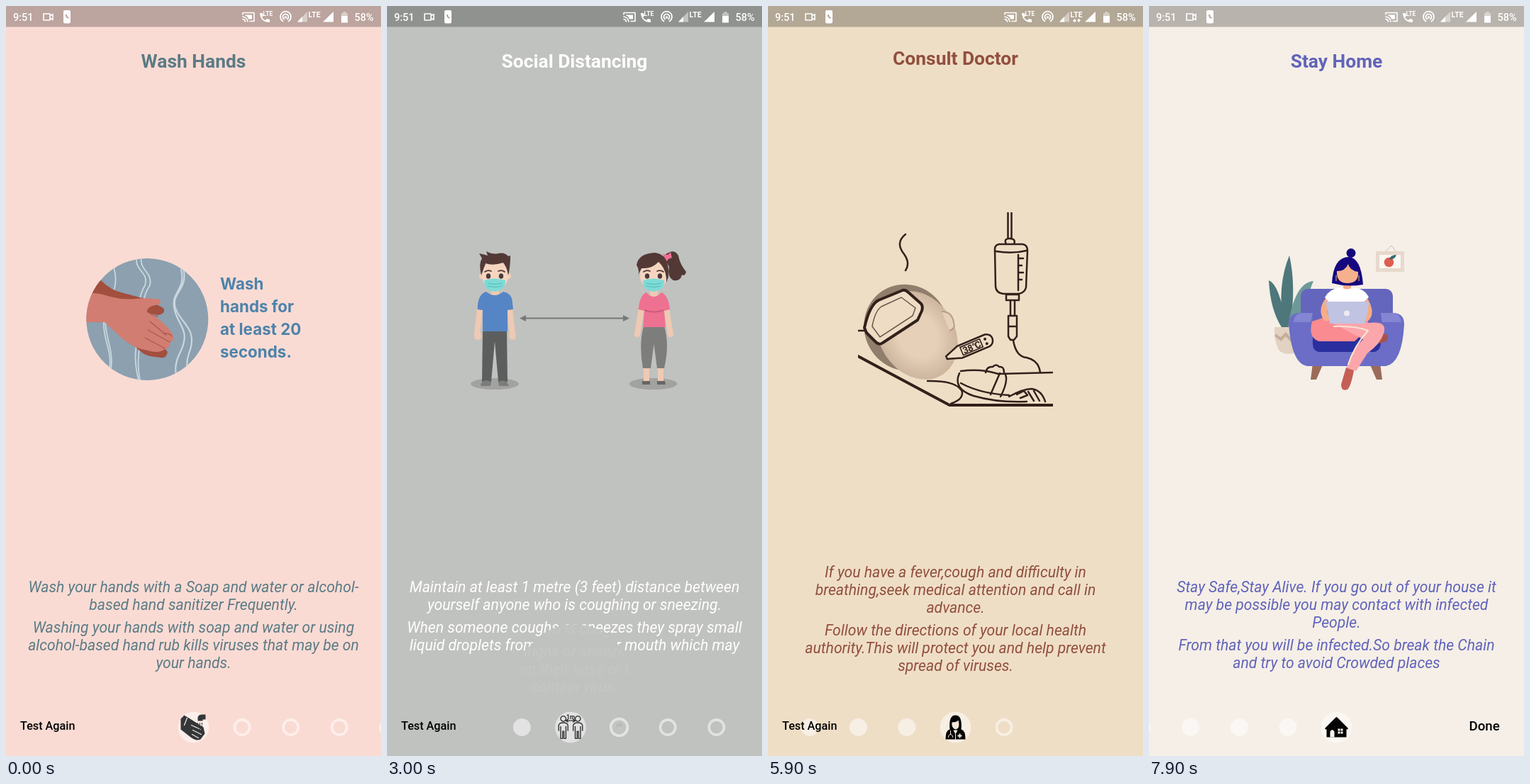
An HTML page for the animation above (8 s loop, 529 by 1058 pixels).

```html
<!DOCTYPE html>
<html lang="en">
<head>
<meta charset="utf-8">
<title>Health tips onboarding</title>
<style>
html, body { margin: 0; width: 100%; height: 100%; overflow: hidden; }
svg { display: block; width: 100%; height: 100%; font-family: Roboto, sans-serif; }
.title { font-size: 26.4px; font-weight: 700; text-anchor: middle; }
.body { font-size: 21.2px; font-style: italic; text-anchor: middle; }
.line { fill: none; stroke-linecap: round; stroke-linejoin: round; }
.btn { font-weight: 500; }
</style>
</head>
<body>
<svg id="stage" viewBox="0 0 529 1058" preserveAspectRatio="none">
<defs>
<clipPath id="reveal"><circle id="hole" cx="264.5" cy="952.2" r="0"/></clipPath>
<clipPath id="disc"><circle cx="199.300" cy="442" r="86"/></clipPath>
<clipPath id="bust"><path d="M115 347H415V546.500H115Z"/></clipPath>
<clipPath id="bed"><path d="M127 291H402V566H127Z"/></clipPath>
<radialGradient id="skin"><stop offset=".5" stop-color="#e6d0b8"/><stop offset="1" stop-color="#cdb59e"/></radialGradient>

<!-- hands -->
<g id="art0">
  <g clip-path="url(#disc)">
    <path fill="#8ca0b0" d="M113 356H286V528H113Z"/>
    <g class="line" stroke="#c9d7dd" stroke-width="1.800">
      <path d="M150 362Q158 385 152 402M138 445C136 470 150 485 146 512M140 445C141 470 152 487 148 512"/>
      <path d="M184 355C182 375 202 375 196 394Q190 405 189 413M191 355C188 373 207 375 203 394Q196 405 195 413M184 478Q180 500 187 528M189 480Q184 500 189 528"/>
      <path d="M250 370C258 400 232 405 239 426C246 448 272 455 258 490Q252 508 259 525M247 372C254 400 234 402 237 424C240 450 262 455 246 488Q237 505 240 520" stroke-width="2.200"/>
    </g>
    <path fill="#a24f3e" d="M119 405Q125 392 134 387Q147 401 166 405L196 413Q213 421 222 426Q226 434 214 436L200 433L165 428ZM182 480Q193 492 203 494L218 496Q226 497 227 491Q230 486 222 483L200 478Z"/>
    <path fill="#d27d71" d="M110 405Q130 404 147 410Q165 415 183 413Q203 411 217 414Q221 421 211 422Q199 424 199 431C213 439 230 452 236 465Q238 472 231 475Q232 482 224 484Q216 491 200 486Q180 483 164 469L139 446H110Z"/>
    <path class="line" stroke="#a8594f" stroke-width="1.300" d="M203 445L226 464M200 457L231 474M196 468L224 483M199 431Q207 437 214 438M222 462Q231 461 234 466"/>
  </g>
  <g id="wash" fill="#4c83aa" font-family="Inter, sans-serif" font-size="22.400" font-weight="700"></g>
</g>

<!-- distance -->
<g id="art1">
  <g fill="#a2a3a0"><ellipse cx="152" cy="533" rx="34" ry="8"/><ellipse cx="375.500" cy="533" rx="34" ry="8"/></g>
  <path fill="none" stroke="#777977" stroke-width="2" d="M194 440.500H336"/>
  <path fill="#777977" d="M187 440.500L196 436V445ZM342 440.500L333 436V445Z"/>
  <g>
    <path class="line" stroke="#efc9b3" stroke-width="8" d="M131 425L127 463M173 425L177 463"/>
    <ellipse fill="#efc9b3" cx="128" cy="465" rx="5" ry="6"/><ellipse fill="#efc9b3" cx="177" cy="465" rx="5" ry="6"/>
    <path fill="#5c5e5d" d="M135 456H169L170 530H157L152 473L147 530H134Z"/>
    <path fill="#7b7c7b" d="M132 536Q133 528 140 528L147 530L146 536ZM158 536L157 530Q168 525 172 536Z"/>
    <path fill="#efc9b3" d="M147 394H158V409H147Z"/>
    <path fill="#5685c5" d="M140 403Q152 413 164 403Q175 405 176.500 415L178 428L170 429V459H135V429L127.500 428Q128 406 140 403Z"/>
    <circle fill="#f3cfb8" cx="134" cy="381" r="4"/><circle fill="#f3cfb8" cx="171" cy="381" r="4"/>
    <ellipse fill="#f5d5c0" cx="152.500" cy="380" rx="18.500" ry="21"/>
    <path fill="#523936" d="M133 380Q129 363 134 356L130 349Q139 351 142 352L140 346Q149 351 157 349Q166 347 171 353L174 352Q174 368 171 380Q169 368 164 362Q149 367 139 363Z"/>
  </g>
  <g>
    <path fill="#523936" d="M390 353Q404 340 411 352Q413 364 422 375Q420 382 416 379Q414 389 404 387Q395 382 398 368Z"/>
    <path fill="#ee7191" d="M389 350L396 351L400 347L402 355L397 357L394 361Z"/>
    <path class="line" stroke="#efc9b3" stroke-width="8" d="M360 420L353 463M393 420L400 463M366 508V529M386 508V529"/>
    <path fill="#7d7e7c" d="M362 451H391Q399 478 391 511H381L376.500 477L372 511H361Q355 478 362 451Z"/>
    <path fill="#666" d="M360 529H371V534H360ZM381 529H392L393 534H381Z"/>
    <path fill="#efc9b3" d="M371 395H382V412H371Z"/>
    <path fill="#ee7191" d="M366 404Q376 416 387 404Q397 408 399 428L391 430L393 453H361L363 430L354.500 428Q357 407 366 404Z"/>
    <path fill="none" stroke="#b84f72" stroke-width="2" stroke-dasharray="2 1" d="M364 429Q376 434 390 429"/>
    <ellipse fill="#f5d5c0" cx="376" cy="380" rx="19" ry="21"/>
    <path fill="#523936" d="M354 380Q357 375 352 365Q355 349 378 348Q399 350 397 382L394 390Q395 372 383 361Q374 371 359 370Z"/>
  </g>
  <g id="faces"></g>
</g>

<!-- face -->
<g id="art2" clip-path="url(#bust)">
  <path fill="#189b92" d="M121 549Q132 522 165 512L225 493H300L318 499Q340 506 365 512Q396 521 408 549Z"/>
  <path fill="#075165" d="M208 400L209 345H320Q323 368 322 400L314 438L303 464L299 486H214V440Z"/>
  <g fill="#fafafa" stroke="#075165" stroke-width="4"><path d="M216 398Q204 388 202 404Q202 432 214 441M313 398Q326 388 328 404Q327 432 315 441"/></g>
  <path fill="#fafafa" d="M217 362H278Q291 361 298 354Q312 366 313 395V430Q308 454 299 463V487L319 500Q297 521 262 514L212 500L216 430Z"/>
  <path class="line" stroke="#075165" stroke-width="4" d="M229 407Q240 415 251 407M281 407Q292 415 304 407"/>
  <path class="line" fill="#fafafa" stroke="#075165" stroke-width="4" style="fill:#fafafa" d="M198 551L216 507Q212 475 220 454Q229 449 229 474L252 426Q258 416 267 423Q274 415 283 426Q294 423 298 435Q297 443 293 450Q303 446 303 456Q302 464 292 482Q273 511 266 514Q255 529 249 551"/>
  <path class="line" stroke="#075165" stroke-width="4" d="M267 424L247 466M283 426L263 469M294 448L279 477"/>
  <path stroke="#e55e50" stroke-width="11" d="M227 490L260 523M260 490L227 523"/>
</g>

<!-- doctor -->
<g id="art3" clip-path="url(#bed)">
  <g class="line" stroke="#32201b" stroke-width="2.500">
    <path stroke-width="4" d="M125 493L256 563H404"/>
    <path d="M125 458H136M194 322Q179 334 192 350Q201 363 194 373"/>
    <path d="M272 515Q300 511 325 519Q362 518 404 517M225 529Q263 528 273 542Q278 554 258 561M270 518Q260 540 290 550Q325 560 365 558M272 532Q300 547 340 549"/>
    <path d="M314 548L327 518M328 551Q339 530 335 520M307 517Q309 508 317 509Q322 504 326 509Q333 508 333 517M340 551Q360 540 372 540Q386 542 391 558M351 548L361 543L366 549L356 553M367 544L375 557M375 543L383 557"/>
    <path d="M338.500 290V328M343.500 290V328M336 336Q332 328 341 328Q350 328 347 336M326 336H359Q366 337 366 345L364 397Q362 405 353 406H332Q322 405 321 396L320 343Q320 337 326 336Z"/>
    <path d="M321 346Q345 350 365 345M353 351V401M353 356H360M353 366H358M353 376H360M353 386H358M336 407H354V415H336ZM342 416V436M348 416V436M339 437H351V466L347 471H342L339 466ZM339 452H351M346 472Q350 495 365 496Q382 500 384 517"/>
  </g>
  <g transform="rotate(-33 203 462)">
    <ellipse cx="201" cy="451" rx="59" ry="62" fill="#907d6b"/>
    <ellipse cx="208" cy="468" rx="53" ry="66" fill="url(#skin)"/>
  </g>
  <path fill="#e6d0b8" stroke="#b49d88" stroke-width="2" d="M245 431Q260 431 262 447Q265 455 256 458"/>
  <path fill="#eedcc5" stroke="#32201b" stroke-width="4" stroke-linejoin="round" d="M136 454Q143 422 156 415L190 401Q194 400 198 404L216 420Q219 424 217 430L211 443L162 475Q157 479 152 474L139 461Z"/>
  <path fill="none" stroke="#6a5548" stroke-width="1.500" d="M147 452Q151 430 160 424L188 411L208 426L204 437L158 467Z"/>
  <g transform="translate(252 496) rotate(-23)">
    <path fill="#eedcc5" stroke="#32201b" stroke-width="2.500" d="M0 -2L20 -9H62Q70 -7 70 0Q69 8 62 9H20L0 2Z"/>
    <path fill="none" stroke="#32201b" stroke-width="1.600" d="M23 -6H53V6H23Z"/>
    <text x="25" y="5" font-size="13" font-weight="700" fill="#32201b">38℃</text>
    <circle cx="60" cy="-3" r="2" fill="#32201b"/><circle cx="60" cy="4" r="2" fill="#32201b"/>
  </g>
</g>

<!-- home -->
<g id="art4">
  <path fill="#4d777b" d="M187 453Q171 428 169 387Q184 392 194 453ZM190 453Q180 395 198 352Q208 395 199 453Z"/>
  <path fill="#6f9999" d="M196 453Q205 390 232 388Q225 403 225 415Q215 430 203 453Z"/>
  <path fill="#e2d2c2" d="M177 453H208L210 489Q190 494 183 485Q176 472 177 453Z"/>
  <path fill="none" stroke="#c5ad9a" stroke-width="4" d="M178 464L186 470L193 463L200 471L208 464"/>
  <path fill="#9a6b58" d="M231 504H246L236 527H228ZM311 504H326L329 527H321Z"/>
  <rect x="214" y="399" width="130" height="85" rx="10" fill="#6466bd"/>
  <rect x="229" y="463" width="99" height="27" rx="9" fill="#2a2e9f"/>
  <path fill="#6b6dc6" d="M197 447Q199 433 212 433H231V473Q230 487 240 488H318Q328 486 327 470V433H346Q360 434 360 449Q357 504 334 508H224Q201 506 197 447Z"/>
  <path fill="#8486d4" d="M204 443Q207 433 216 433H231L228 446H204ZM327 433H346Q355 435 356 446H329Z"/>
  <path fill="#a6534f" d="M314 463L336 463Q340 473 329 475L312 478Z"/>
  <path fill="#f98b91" d="M230 445Q224 468 240 473H290L309 455V440H245Z"/>
  <path fill="#fba6ab" d="M258 447H311Q337 444 331 462Q326 477 308 490L292 515L279 510Q284 488 302 470Z"/>
  <path class="line" stroke="#f8e9d5" stroke-width="2" d="M261 452Q292 451 309 458Q289 480 281 506"/>
  <path fill="#c65e55" d="M278 510L289 514Q285 536 280 541Q271 544 271 534Z"/>
  <path class="line" stroke="#f5ad89" stroke-width="9" d="M252 416Q243 429 250 440M305 416Q314 432 307 440"/>
  <path fill="#f5ad89" d="M274 385H285V403H274Z"/>
  <path fill="#fff" d="M272 397Q279 402 287 397Q304 398 310 411L302 418H254L248 411Q255 398 272 397Z"/>
  <circle cx="285" cy="348.500" r="6.500" fill="#15087f"/>
  <path fill="#15087f" d="M258 391Q260 355 281 354Q299 354 302 393Q280 397 258 391Z"/>
  <path fill="#f5b18d" d="M265 374Q277 374 281 364Q283 373 295 375Q296 391 280 391Q264 391 265 374Z"/>
  <path fill="none" stroke="#eac56e" d="M264 380V388M296 380V388"/>
  <path fill="#c1c3e2" d="M251 417H308Q310 417 310 420L305 448H255L250 421Q249 417 251 417Z"/>
  <circle cx="279" cy="433.500" r="4" fill="#eceaf3"/>
  <path fill="none" stroke="#cdbfb2" d="M333 347L342 338L349 347"/>
  <path fill="#fbf7f2" stroke="#e7d9cd" stroke-width="5" d="M322.500 348.500H357.500V372.500H322.500Z"/>
  <circle cx="338.500" cy="361.500" r="6.800" fill="#e15d50"/><path fill="#3d6e6e" d="M339 358Q340 351 349 351Q347 358 339 358Z"/>
</g>

<!-- indicator icons, centred on 0 0 -->
<g id="icon0">
  <path fill="#343638" d="M-18 -12L-13 -17Q0 -9 14 0L16 9L10 17Q4 20 -4 14L-18 3ZM6 -9V-14Q7 -18 12 -18H17V-11H13V-9Z"/>
  <path class="line" stroke="#eee6df" stroke-width="1.300" d="M-9 -13L-13 -3M-3 -3L10 3M-1 4L11 10M-2 10L7 15"/>
  <path class="line" stroke="#343638" stroke-width="1.200" stroke-dasharray="2 2" d="M6 -6V4M9 -6V4M12 -6V4"/>
</g>
<g id="icon1" class="line" stroke="#222" stroke-width="1.500">
  <path id="mate" d="M-11 -9A4 4 0 1 1 -10.900 -9M-18 5V-3Q-17 -7 -11 -7Q-5 -7 -4 -3V5M-15 -1V17H-12V6H-10V17H-7V-1"/>
  <use href="#mate" x="22"/>
  <path d="M-7 -10H7M-7 -10L-4 -12M-7 -10L-4 -8M7 -10L4 -12M7 -10L4 -8"/>
  <text y="-12" font-size="9" font-weight="700" text-anchor="middle" fill="#222" stroke="none">1m</text>
</g>
<g id="icon2">
  <path fill="#fff" stroke="#222" stroke-width="1.500" d="M-15 -4Q-19 -3 -17 3Q-16 8 -13 7Q-10 24 0 24Q10 24 13 7Q17 7 17 1Q18 -4 15 -4Z"/>
  <path fill="#252525" d="M-16 2Q-20 -10 -14 -17L-8 -19L-9 -22L-2 -20L1 -25L4 -21L10 -21L10 -18L16 -16Q20 -9 16 2L13 -5Q7 -11 3 -8Q-5 -7 -10 -11Z"/>
  <path class="line" stroke="#222" stroke-width="1.400" d="M-9 0H-4M4 0H9M-7 4V5M7 4V5M0 4L-1 10H1M-5 15Q0 19 5 15"/>
</g>
<g id="icon3">
  <path fill="#050505" d="M-8 3Q-10 -17 0 -17Q10 -17 8 3Q14 4 14 17H-14Q-14 4 -8 3Z"/>
  <path fill="#f3e8d9" d="M-5 -7Q2 -7 4 -10Q7 2 0 3Q-6 1 -5 -7ZM-3 4H3L0 10ZM5 9H7V11H9V13H7V15H5V13H3V11H5Z"/>
  <path class="line" stroke="#f3e8d9" d="M-7 5V10M-10 14Q-10 10 -7 10Q-4 10 -4 14M0 10V17"/>
</g>
<g id="icon4">
  <path fill="#050505" d="M-16 1L-1 -14Q0 -15 1 -14L16 1Q17 3 14 3V14H-14V3Q-17 3 -16 1Z"/>
  <path fill="#f8f4ef" d="M-9 14V6Q-6 1 -3 6V14ZM2 2H5V5H2ZM6 2H9V5H6ZM2 6H5V9H2ZM6 6H9V9H6Z"/>
</g>
</defs>

<g id="base"></g>
<g id="top" clip-path="url(#reveal)"></g>
<g id="dots"></g>
<text id="again" class="btn" x="20" y="1021.300" font-size="16.200">Test Again</text>
<text id="done" class="btn" x="451.500" y="1022" font-size="18.700">Done</text>

<!-- status bar -->
<path d="M0 0H529V29.500H0Z" opacity=".25"/>
<g fill="#fff" class="btn" font-size="14.500">
  <text x="10" y="21">9:51</text><text x="491.500" y="21">58%</text>
  <g class="line" stroke="#fff" stroke-width="1.600">
    <path d="M53 11H62V20H53ZM62 14L66 11.500V19.500L62 17"/>
    <path d="M334 12V9.500H350V21.500H344M334 15Q340 16 341 22M334 18.500Q337 19 337.500 22"/>
    <path d="M390.500 21.500A7.500 7.500 0 1 1 398.500 21.500M392 18.500A4 4 0 1 1 397 18.500" stroke-width="1.800"/>
  </g>
  <rect x="81" y="6" width="10" height="18.500" rx="2"/>
  <path fill="#b3a49e" d="M84 12Q84 19 90 17Q86 16 86 12Z"/>
  <path d="M337 12.500H347V18.500H342Q341 14 337 13.500ZM358 10H362L363 14L361 16Q363 19 366 20L368 18L372 19V23Q359 23 358 10Z"/>
  <circle cx="394.500" cy="16" r="1.800"/>
  <path opacity=".45" d="M411 22.500L425 8V22.500Z"/><path d="M411 22.500L418 15V22.500ZM447 22.500L462 8V22.500Z"/>
  <path opacity=".45" d="M473 10H475.500V8H479.500V10H482V15H473Z"/><path d="M473 14H482V23.500H473Z"/>
  <text x="362.500" y="13.500" font-size="8.500" font-weight="700">LTE</text>
  <text x="426.500" y="16" font-size="10.500" font-weight="700">LTE</text>
  <path id="traffic" d="M430 21L432.500 18L435 21L432.500 23ZM436 20L438.500 18L441 20L438.500 23Z"/>
</g>
</svg>
<script>
const $ = id => document.getElementById(id);
const MID = 264.5, GAP = 68.6, UNIT = 1.247, RADIUS = 988;

// bg, ink, title, title baseline, lines, first baselines of both paragraphs
const pages = [
  { bg: '#fadbd4', ink: '#5b7b85', title: 'Wash Hands', y: 87, at: [827, 883.5],
    text: [['Wash your hands with a Soap and water or alcohol-', 'based hand sanitizer Frequently.'],
      ['Washing your hands with soap and water or using', 'alcohol-based hand rub kills viruses that may be on', 'your hands.']] },
  { bg: '#c0c2bf', ink: '#fff', title: 'Social Distancing', y: 87, at: [827, 883.5],
    text: [['Maintain at least 1 metre (3 feet) distance between', 'yourself anyone who is coughing or sneezing.'],
      ['When someone coughs or sneezes they spray small', 'liquid droplets from their nose or mouth which may', 'contain virus.']] },
  { bg: '#b9dcda', ink: '#149a91', title: "Don't touch your face", y: 89, at: [837.5, 881],
    text: [['Hands touch many surfaces and can pick up viruses.'],
      ['Once contaminated, hands can transfer the virus to', 'your eyes, nose or mouth. From there, the virus can', 'enter your body and can make you sick.']] },
  { bg: '#efdec6', ink: '#914f3e', title: 'Consult Doctor', y: 83, at: [806, 887.5],
    text: [['If you have a fever,cough and difficulty in', 'breathing,seek medical attention and call in', 'advance.'],
      ['Follow the directions of your local health', 'authority.This will protect you and help prevent', 'spread of viruses.']] },
  { bg: '#f5efe7', ink: '#6163ba', title: 'Stay Home', y: 87, at: [827, 908.5],
    text: [['Stay Safe,Stay Alive. If you go out of your house it', 'may be possible you may contact with infected', 'People.'],
      ['From that you will be infected.So break the Chain', 'and try to avoid Crowded places']] }
];

// time and page position
const track = [[0, 0], [600, .38], [700, .38], [800, .42], [900, .42], [1000, .5], [1600, .586], [1800, .95],
  [1900, .985], [2000, 1], [2600, 1], [3000, 1.081], [3200, 1.38], [3300, 1.38], [3400, 1.55], [3900, 1.98],
  [4000, 2], [4800, 2], [4900, 2.04], [5000, 2.04], [5800, 2.97], [5900, 3], [6200, 3], [6700, 3.291],
  [7100, 3.42], [7200, 3.55], [7600, 3.95], [7700, 4], [8000, 4]];

const lines = (rows, x, y, step) => rows.map((s, i) => `<text x="${x}" y="${y + i * step}">${s}</text>`).join('');

const layer = ({ bg, ink, title, y, at, text }, i) => `<g>
  <rect width="529" height="1058" fill="${bg}"/>
  <text class="title" x="${MID}" y="${y}" fill="${ink}">${title}</text>
  <g><use href="#art${i}"/></g>
  <g class="body" fill="${ink}">${text.map((rows, k) => lines(rows, MID, at[k], 25)).join('')}</g></g>`;

const maskedFace = x => `<g fill="#4b3a38"><ellipse cx="${x - 9}" cy="381" rx="3.200" ry="3.800"/><ellipse cx="${x + 9}" cy="381" rx="3.200" ry="3.800"/></g>
  <path class="line" stroke="#523936" stroke-width="1.800" d="M${x - 14} 375q4 -3 9 -1m10 0q5 -2 9 1"/>
  <path fill="#7edbd7" d="M${x - 15} 387q15 -5 30 0q1 13 -15 16q-16 -3 -15 -16"/>
  <path class="line" stroke="#55b9ba" d="M${x - 10} 391q10 3 20 0m-20 4q10 3 20 0"/>`;

$('wash').innerHTML = lines(['Wash', 'hands for', 'at least 20', 'seconds.'], 302, 399.5, 32.2);
$('faces').innerHTML = maskedFace(152) + maskedFace(376);
$('base').innerHTML = $('top').innerHTML = pages.map(layer).join('');
$('dots').innerHTML = pages.map((p, i) =>
  `<g><circle fill="#fff"/><circle fill="none" stroke="#fff" stroke-opacity=".53" stroke-width="3.700"/><use href="#icon${i}"/></g>`).join('');

const base = [...$('base').children], top_ = [...$('top').children], dots = [...$('dots').children];

function position(t) {
  const k = track.findIndex(([end]) => t < end);
  const [t0, a] = track[k - 1], [t1, b] = track[k];
  return a + (b - a) * (t - t0) / (t1 - t0);
}

const only = (list, i) => list.forEach((g, k) => g.style.display = k === i ? '' : 'none');

function drawPages(cur, p) {
  // The incoming page takes over once the drag is about half way.
  const next = p < .48 ? cur : cur + 1;
  only(base, cur);
  only(top_, p > 0 ? next : -1);
  $('hole').setAttribute('r', RADIUS * p);
  if (p > 0) [...top_[next].children].slice(1).forEach((el, k) => {
    const shift = (k === 1 ? 50 : 30) * UNIT * (1 - p);
    el.setAttribute('transform', `translate(0 ${shift})`);
    el.setAttribute('opacity', p);
  });
}

function drawDots(pos, cur) {
  dots.forEach((dot, i) => {
    const active = Math.max(0, 1 - Math.abs(i - pos));
    const r = Math.min(20 + 25 * active, 35) * UNIT / 2;
    const hollow = i > cur;
    const [disc, ring, icon] = dot.children;
    dot.setAttribute('transform', `translate(${MID + GAP * (i - pos)} 1017.5)`);
    disc.setAttribute('r', r);
    disc.setAttribute('opacity', hollow ? .53 * active : .53);
    ring.setAttribute('r', r - 1.85);
    ring.setAttribute('opacity', hollow ? 1 : 0);
    icon.setAttribute('transform', `scale(${.17 + .83 * active})`);
    icon.setAttribute('opacity', active);
  });
}

function render(ms) {
  const t = Math.floor(ms % 8000 / 100) * 100;
  const pos = position(t), cur = Math.floor(pos + 1e-6), p = Math.max(0, pos - cur);
  const leave = Math.max(0, pos - 3);
  drawPages(cur, p < 1e-5 ? 0 : p);
  drawDots(pos, cur);
  $('again').setAttribute('opacity', 1 - leave);
  $('done').setAttribute('opacity', Math.min(1, leave * 3.2));
  const busy = (t >= 1000 && t < 1900) || (t >= 5100 && t < 6100);
  $('traffic').setAttribute('opacity', busy ? 1 : 0);
}

const start = performance.now();
function tick() {
  render(performance.now() - start);
  requestAnimationFrame(tick);
}
tick();
</script>
</body>
</html>
```
